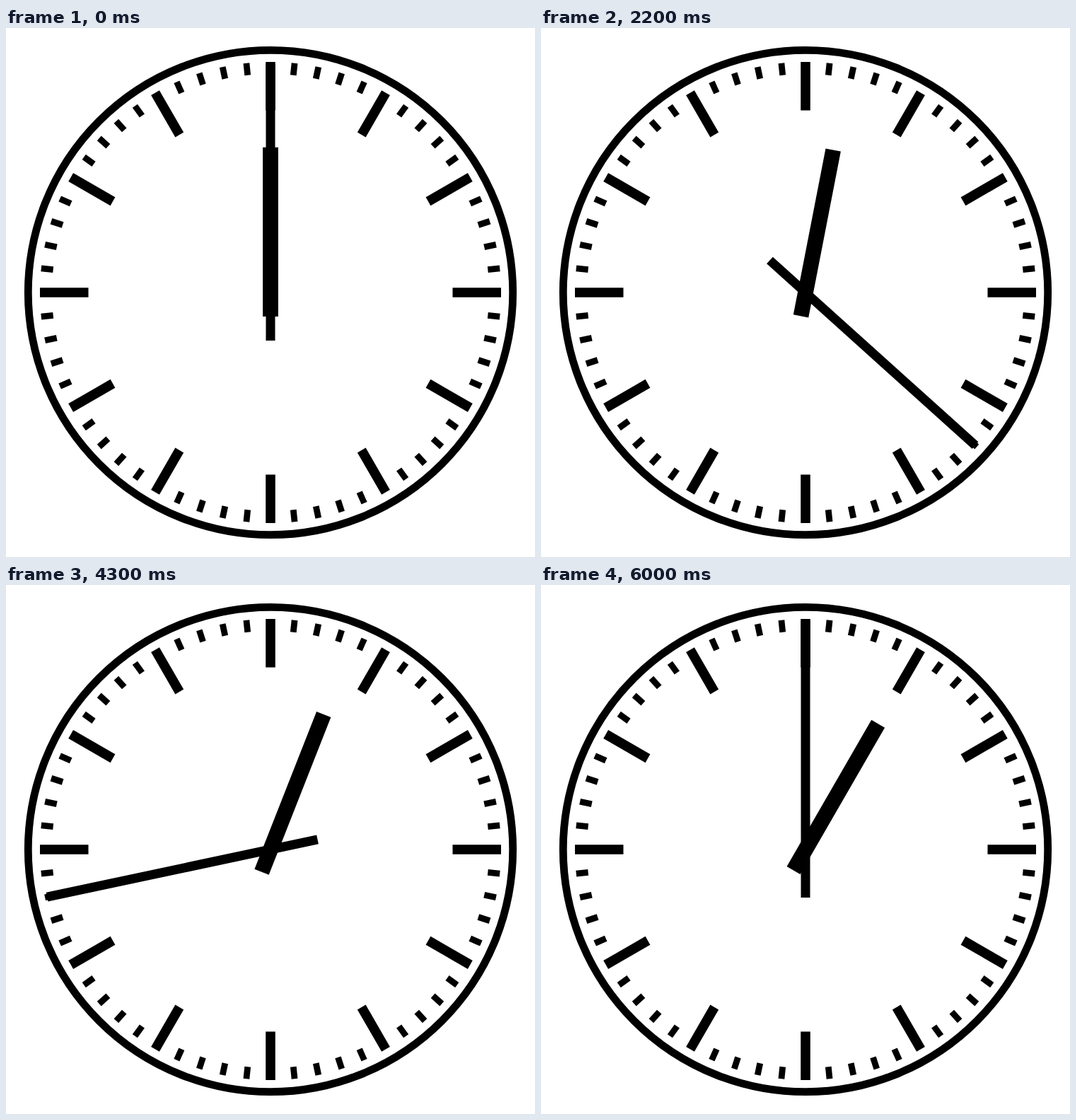
An HTML page that plays this animation: 748x748 px, repeating every 7000 ms.

```html
<!DOCTYPE html>
<html lang="en">
<head>
<meta charset="utf-8">
<title>Clock</title>
<style>
  html, body { margin: 0; width: 100%; height: 100%; overflow: hidden; background: #fff; }
  svg { display: block; width: 100%; height: 100%; }
</style>
</head>
<body>
<svg viewBox="-374 -374 748 748" fill="none" stroke="#000">
  <circle r="342.7" stroke-width="10.8"/>
  <g id="ticks"></g>
  <line id="hour" y1="34" y2="-205.3" stroke-width="21.8"/>
  <line id="minute" y1="68" y2="-323" stroke-width="13"/>
</svg>
<script>
  const STEP = 100, LOOP = 7000, MINUTES = 60;
  const byId = id => document.getElementById(id);
  const turn = (el, deg) => el.setAttribute('transform', `rotate(${deg})`);

  function addTick(i) {
    const isHour = i % 5 === 0;
    const tick = document.createElementNS('http://www.w3.org/2000/svg', 'line');
    tick.setAttribute('y1', -326);
    tick.setAttribute('y2', isHour ? -257.5 : -309);
    tick.setAttribute('stroke-width', isHour ? 13.6 : 8.8);
    turn(tick, i * 6);
    byId('ticks').append(tick);
  }
  for (let i = 0; i < MINUTES; i++) addTick(i);

  // One minute per step, then a pause on the full hour.
  function draw(ms) {
    const minute = Math.min(MINUTES, Math.floor(ms % LOOP / STEP));
    turn(byId('minute'), minute * 6);
    turn(byId('hour'), minute / 2);
  }

  const start = performance.now();
  function frame() {
    draw(performance.now() - start);
    requestAnimationFrame(frame);
  }
  draw(0);
  requestAnimationFrame(frame);
</script>
</body>
</html>
```
